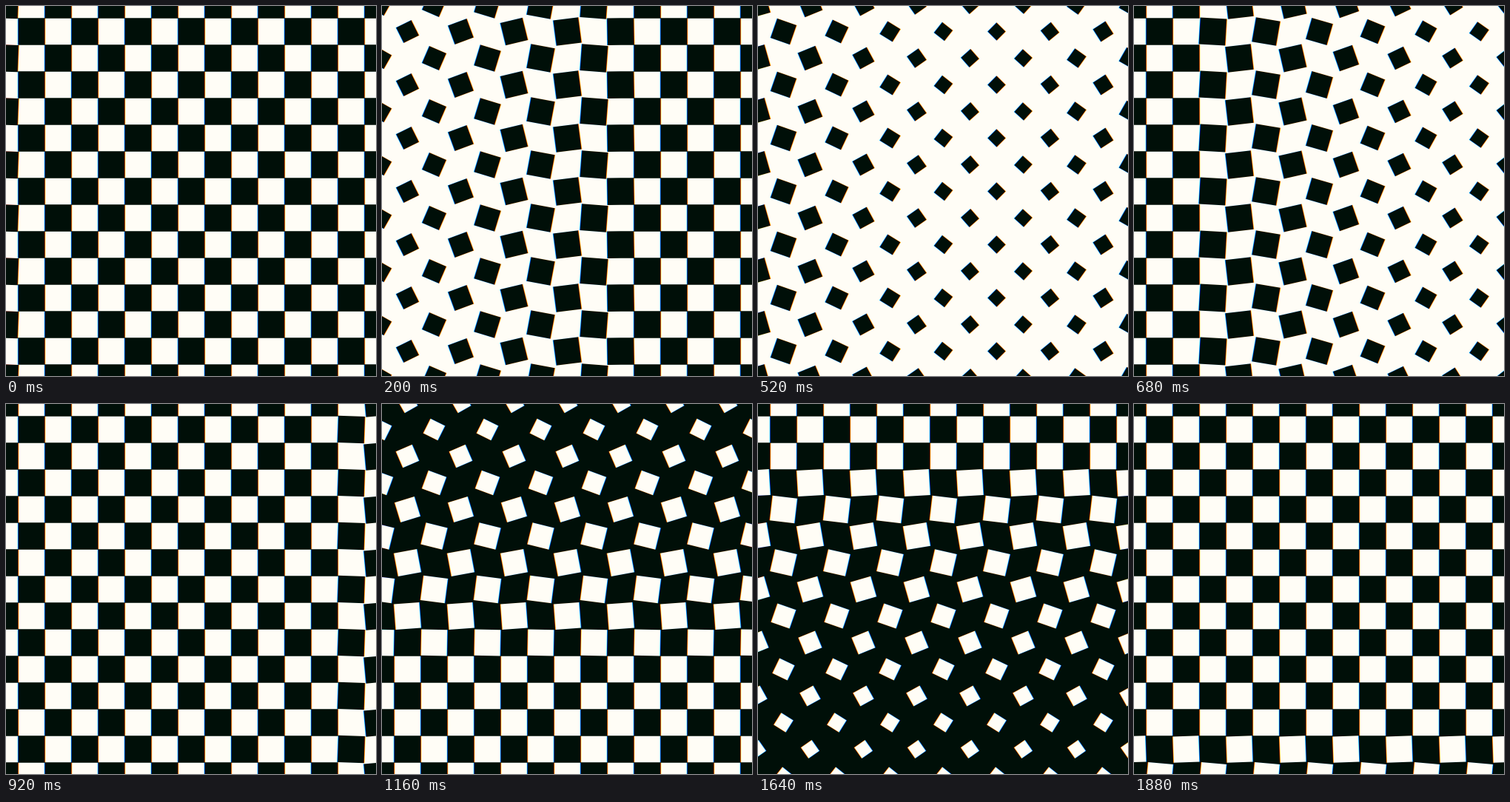
Write an HTML page with a canvas that moves like this. It is 500 by 500 pixels and loops after 1.92 s.

```html
<!DOCTYPE html>
<html lang="en">
<head>
<meta charset="utf-8">
<title>Checkerboard flip</title>
<style>
  html, body { margin: 0; width: 100%; height: 100%; overflow: hidden; background: #fffdf6; }
  canvas { display: block; width: 500px; height: 500px; }
</style>
</head>
<body>
<canvas id="stage" width="500" height="500"></canvas>
<script>
const ctx = document.getElementById('stage').getContext('2d');

const LIGHT = [255, 253, 246];
const DARK = [0, 15, 8];
const CELL = 36, FIRST = 34.5, SHRINK = 19.3;
const SPREAD = 0.6;                        // dark areas are this much wider than light ones
const STEP = 40, HALF = 960;
const LEAD = 14, TURN = 650, DELAY = 0.64; // ms, ms, ms per pixel
const FRINGE = [-0.5, 0, 0.5];             // x shift of red, green, blue

const rgb = c => `rgb(${c.join(',')})`;
const clamp = v => Math.min(1, Math.max(0, v));
const centre = n => FIRST + CELL * n;

function addTile(path, x, y, angle, size) {
  const reach = size / Math.SQRT2;
  for (let k = 0; k < 4; k++) {
    const a = angle + Math.PI / 4 + k * Math.PI / 2;
    const px = x + reach * Math.cos(a), py = y + reach * Math.sin(a);
    if (k) path.lineTo(px, py);
    else path.moveTo(px, py);
  }
  path.closePath();
}

function tiles(time, second) {
  const path = new Path2D();
  const full = CELL + (second ? -SPREAD : SPREAD);
  for (let i = -1; i <= 13; i++) {
    for (let j = -1; j <= 13; j++) {
      if (Boolean((i + j) % 2) !== second) continue;
      const start = centre(second ? j : i) * DELAY - LEAD;
      const progress = clamp((time - start) / TURN);
      const angle = (i % 2 ? 1 : -1) * progress * Math.PI / 2;
      const dip = Math.max(0, Math.sin(Math.PI * progress)) ** 1.65;
      addTile(path, centre(i), centre(j), angle, full - SHRINK * dip);
    }
  }
  return path;
}

function draw(time) {
  const second = time >= HALF;
  const path = tiles(time % HALF, second);
  const ink = second ? LIGHT : DARK;
  const neutral = second ? 0 : 255;

  ctx.globalCompositeOperation = 'source-over';
  ctx.fillStyle = rgb(second ? DARK : LIGHT);
  ctx.fillRect(0, 0, 500, 500);

  // Each colour channel is painted on its own, slightly displaced.
  ctx.globalCompositeOperation = second ? 'lighten' : 'darken';
  FRINGE.forEach((shift, channel) => {
    ctx.fillStyle = rgb(ink.map((v, n) => n === channel ? v : neutral));
    ctx.setTransform(1, 0, 0, 1, shift, 0);
    ctx.fill(path);
  });
  ctx.setTransform(1, 0, 0, 1, 0, 0);
}

const begin = performance.now();
function tick() {
  const elapsed = (performance.now() - begin) % (2 * HALF);
  draw(Math.floor(elapsed / STEP) * STEP);
  requestAnimationFrame(tick);
}
tick();
</script>
</body>
</html>
```
